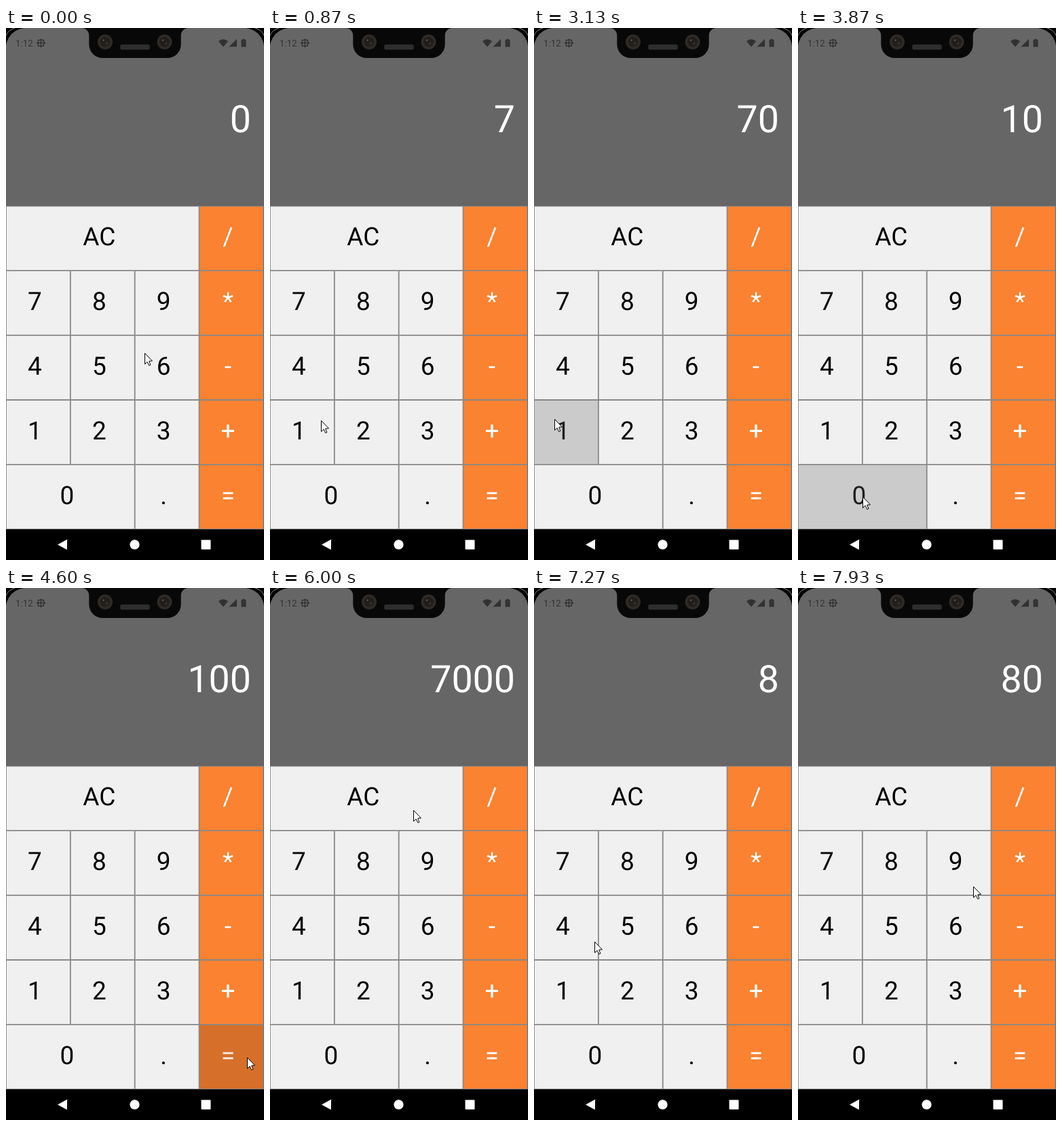
Write an HTML page with a canvas that moves like this. It is 380 px wide and 781 px high and loops after 8 s.

```html
<!DOCTYPE html>
<html lang="en">
<head>
<meta charset="utf-8">
<title>Calculator</title>
<style>
html, body { margin: 0; width: 100%; height: 100%; overflow: hidden; background: #000; }
canvas { display: block; width: 380px; height: 781px; }
</style>
</head>
<body>
<canvas id="stage" width="380" height="781"></canvas>
<script>
const ctx = document.getElementById('stage').getContext('2d');
const WIDTH = 380, LOOP = 8000, TICK = 1000 / 15;
const CELL_W = 94.85, CELL_H = 94.9, TOP = 261.3;
const FONT = 'Roboto, "Open Sans", sans-serif';

// "_" widens the key to its left
const keys = {};
'AC _ _ /|7 8 9 *|4 5 6 -|1 2 3 +|0 _ . ='.split('|').forEach((line, row) => {
  let last;
  line.split(' ').forEach((label, col) => {
    if (label === '_') last.w += CELL_W;
    else last = keys[label] = { x: col * CELL_W, y: TOP + row * CELL_H, w: CELL_W, accent: col === 3 };
  });
});

// A tap aims at the middle of its key unless it says where
function tap(key, down, up, x, y) {
  const k = keys[key];
  return { key, down, up, x: x ?? k.x + k.w / 2, y: y ?? k.y + CELL_H / 2 };
}
const via = (t, x, y) => ({ down: t, up: t, x, y });

const stops = [
  via(0, 204, 477),
  tap('7', 467, 667, 45, 402),
  tap('0', 1200, 1400),
  via(1467, 149, 636),
  via(1600, 269, 496),
  tap('*', 2333, 2467),
  tap('1', 3133, 3267, 30, 574),
  tap('0', 3533, 3667),
  tap('0', 3867, 4000),
  tap('=', 4600, 4733, 355, 689),
  via(5400, 309, 537),
  tap('AC', 6133, 6267, 211, 326),
  tap('8', 6933, 7067, 130, 433),
  via(7267, 89, 519),
  tap('0', 7733, 7933),
  via(7933, 258, 438)
];

// The pointer rests on a key shortly before and during each tap
const path = stops.flatMap(({ key, down, up, x, y }) =>
  key ? [{ t: down - 2 * TICK, x, y, rest: true }, { t: up - TICK, x, y, rest: true }]
      : [{ t: down, x, y }]);

const maths = {
  '+': (a, b) => a + b, '-': (a, b) => a - b,
  '*': (a, b) => a * b, '/': (a, b) => a / b
};

function displayAt(t) {
  let entry = '0', stored = 0, op = '', fresh = true;
  for (const { key, up } of stops) {
    if (!key || t < up) continue;
    if (key === 'AC') { entry = '0'; fresh = true; }
    else if (key === '=') { entry = String(maths[op](stored, +entry)); fresh = true; }
    else if (maths[key]) { stored = +entry; op = key; fresh = true; }
    else { entry = fresh ? key : entry + key; fresh = false; }
  }
  return entry;
}

function slope(i, axis) {
  const a = path[i - 1], b = path[i], c = path[i + 1];
  if (!a || !c || b.rest) return 0;
  return (c[axis] - a[axis]) / (c.t - a.t);
}

function pointerAt(t) {
  let i = 0;
  while (i < path.length - 2 && t >= path[i + 1].t) i++;
  const a = path[i], b = path[i + 1], span = b.t - a.t;
  const u = Math.min(1, (t - a.t) / span), v = 1 - u;
  const along = axis => Math.round(
    v * v * (1 + 2 * u) * a[axis] + u * u * (1 + 2 * v) * b[axis] +
    u * v * span * (v * slope(i, axis) - u * slope(i + 1, axis)));
  return [along('x'), along('y')];
}

function rect(x, y, w, h, color, r = 0) {
  ctx.fillStyle = color;
  ctx.beginPath();
  ctx.roundRect(x, y, w, h, r);
  ctx.fill();
}

function disc(x, y, r, color) {
  ctx.fillStyle = color;
  ctx.beginPath();
  ctx.arc(x, y, r, 0, 7);
  ctx.fill();
}

function poly(points, color) {
  ctx.fillStyle = color;
  ctx.beginPath();
  points.forEach(p => ctx.lineTo(...p));
  ctx.closePath();
  ctx.fill();
}

function text(s, x, y, size, color, align) {
  ctx.font = size + 'px ' + FONT;
  ctx.textRendering = 'geometricPrecision';
  ctx.textAlign = align;
  ctx.fillStyle = color;
  ctx.fillText(s, x, y);
}

function camera(x) {
  disc(x, 20.5, 11, '#302b26');
  disc(x, 20.5, 7.5, '#211e1b');
  disc(x - 2.5, 18, 1.1, '#6d655d');
  disc(x + 2.5, 22.5, 1, '#5d554d');
}

// One half of the phone's top edge; the other is its mirror image
function topHalf() {
  ctx.fillStyle = '#000';
  ctx.beginPath();
  ctx.moveTo(0, 0);
  ctx.lineTo(27, 0);
  ctx.quadraticCurveTo(5, 3, 0, 25);
  ctx.fill();
  ctx.strokeStyle = '#8a8a8a';
  ctx.lineWidth = 1;
  ctx.beginPath();
  ctx.moveTo(0, 11);
  ctx.quadraticCurveTo(3, 3, 13, 0);
  ctx.stroke();

  ctx.fillStyle = '#080808';
  ctx.beginPath();
  ctx.moveTo(111, 0);
  ctx.arcTo(122.3, 0, 122.3, 12, 11);
  ctx.arcTo(122.3, 44, 150, 44, 20);
  ctx.lineTo(WIDTH / 2 + 1, 44);
  ctx.lineTo(WIDTH / 2 + 1, 0);
  ctx.fill();
}

function phoneTop() {
  topHalf();
  ctx.save();
  ctx.translate(WIDTH, 0);
  ctx.scale(-1, 1);
  topHalf();
  ctx.restore();
  camera(146);
  camera(233.5);
  rect(168, 24, 44, 8, '#292929', 3);
  for (let x = 170; x < 210; x += 2) {
    rect(x, 26, 1, 1, '#444');
    rect(x, 29, 1, 1, '#444');
  }
}

function statusBar() {
  const ink = '#323232';
  text('1:12', 14, 27, 13.3, ink, 'left');

  ctx.strokeStyle = ink;
  ctx.lineWidth = 1.4;
  ctx.beginPath();
  ctx.arc(51.5, 22, 4.8, 0, 7);
  for (let i = 0; i < 8; i++) {
    const c = Math.cos(i * Math.PI / 4), s = Math.sin(i * Math.PI / 4);
    const inner = i % 2 ? 5 : 0;
    ctx.moveTo(51.5 + c * inner, 22 + s * inner);
    ctx.lineTo(51.5 + c * 6.6, 22 + s * 6.6);
  }
  ctx.stroke();

  ctx.fillStyle = ink;
  ctx.beginPath();
  ctx.moveTo(320, 28);
  ctx.lineTo(313, 19.3);
  ctx.quadraticCurveTo(320, 13.8, 327, 19.3);
  ctx.fill();
  poly([[328.5, 27.5], [340, 27.5], [340, 16]], ink);
  rect(346.5, 17.2, 7, 10.6, ink);
  rect(348.5, 16, 3, 2, ink);
}

function drawKey(label, { x, y, w, accent }, down) {
  const [idle, pressed] = accent ? ['#fa8231', '#d56f2a'] : ['#f0f0f0', '#cbcbcb'];
  rect(x + 0.9, y + 0.9, w - 1.8, CELL_H - 1.8, down ? pressed : idle);
  ctx.globalAlpha = down ? 0.85 : 1;
  text(label, x + w / 2 - 5, y + 58, 37, accent ? '#fff' : '#000', 'center');
  ctx.globalAlpha = 1;
}

function navBar() {
  rect(0, 736, WIDTH, 45, '#000');
  poly([[76, 758.4], [90, 750.8], [90, 766]], '#fff');
  disc(189.5, 758.4, 7.1, '#fff');
  rect(287.5, 751.4, 14, 14, '#fff', 1);
}

function pointer([x, y]) {
  ctx.save();
  ctx.translate(x + 0.5, y + 0.5);
  ctx.lineWidth = 1;
  ctx.miterLimit = 2;
  ctx.strokeStyle = '#000';
  poly([[0, 0], [0, 16], [3.6, 12.6], [6.2, 18], [8.4, 17.2], [6.2, 11.6], [11, 11.3]], '#fff');
  ctx.stroke();
  ctx.restore();
}

function draw(t) {
  const held = stops.find(s => t >= s.down && t < s.up);
  rect(0, 0, WIDTH, 781, '#666');
  text(displayAt(t), 361, 152.6, 55.5, '#fff', 'right');
  statusBar();
  phoneTop();
  rect(0, TOP, 4 * CELL_W, 5 * CELL_H, '#888');
  for (const label in keys) drawKey(label, keys[label], held && held.key === label);
  navBar();
  pointer(pointerAt(t));
}

const start = performance.now();
function loop() {
  const t = (performance.now() - start) % LOOP;
  // the screen refreshes fifteen times a second
  draw(Math.floor((t + 4) / TICK) * TICK % LOOP + 0.5);
  requestAnimationFrame(loop);
}
loop();
</script>
</body>
</html>
```
